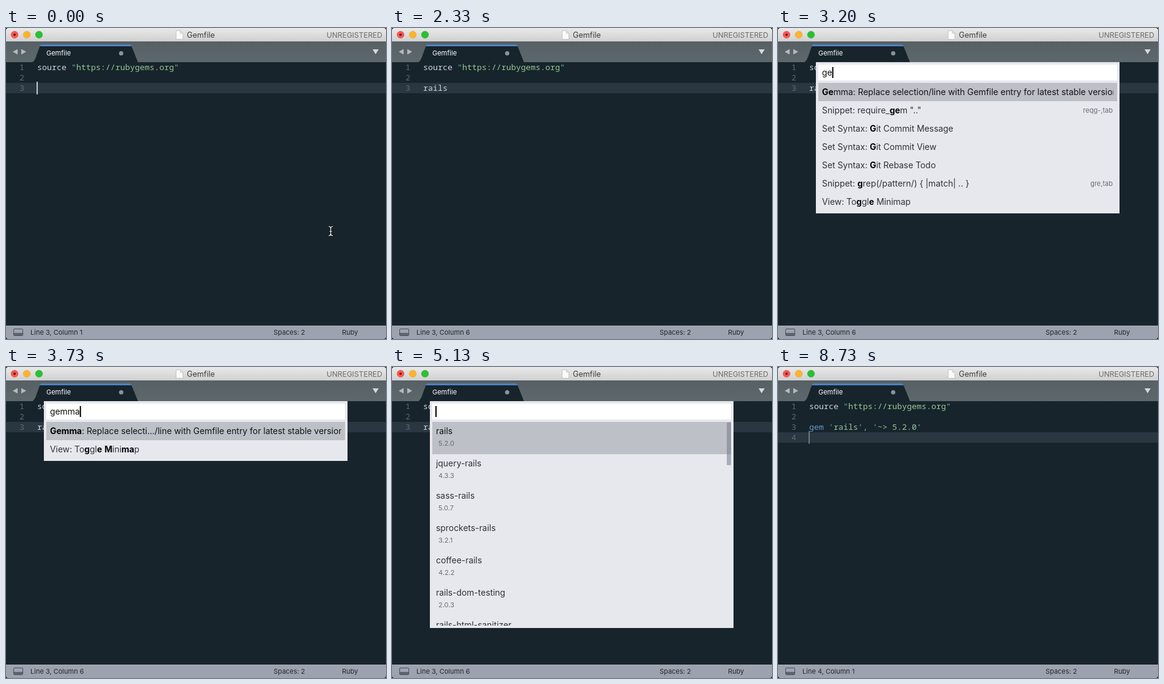
Write an HTML page that moves like this. It is 622 px wide and 510 px high and loops after 8.79 s.

```html
<!DOCTYPE html>
<html lang="en">
<head>
<meta charset="utf-8">
<title>Gemfile</title>
<style>
  html, body { margin: 0; width: 100%; height: 100%; overflow: hidden; background: #000; }
  svg { display: block; width: 622px; height: 510px; }
  text { font-family: Inter, "Open Sans", sans-serif; white-space: pre; }
  .code text { font: 13.33px "Noto Sans Mono", "DejaVu Sans Mono", monospace; fill: #cfd5de; }
  .code .num { fill: #5d6a73; }
  .str { fill: #99c794; }
  .quo { fill: #5fb3b3; }
  .fn { fill: #6699cc; }
  .status { font-size: 11px; fill: #23282e; }
  .item { font-size: 13.9px; fill: #2d323b; }
  .item tspan { font-weight: 700; fill: #000; }
  .sel { fill: #111418; }
  .small { font-size: 11px; fill: #666c77; }
  .typed { font-size: 13.9px; fill: #111; }
</style>
</head>
<body>
<svg viewBox="0 0 622 510" xmlns="http://www.w3.org/2000/svg">
  <defs>
    <linearGradient id="title" x2="0" y2="1">
      <stop stop-color="#e9e9e9"/><stop offset="1" stop-color="#d0d0d0"/>
    </linearGradient>
    <linearGradient id="tabs" x2="0" y2="1">
      <stop stop-color="#566065"/><stop offset="1" stop-color="#5d686c"/>
    </linearGradient>
    <clipPath id="win"><rect width="622" height="510" rx="4"/></clipPath>
    <clipPath id="list"><rect x="66" y="90" width="489" height="334"/></clipPath>
    <clipPath id="words"><rect x="66" y="90" width="483" height="334"/></clipPath>
  </defs>
  <g clip-path="url(#win)">
    <rect width="622" height="510" fill="#17242c"/>

    <rect width="622" height="22" fill="url(#title)"/>
    <circle cx="14" cy="11" r="5.8" fill="#fc5753" stroke="#df4744" stroke-width=".6"/>
    <circle cx="14" cy="11" r="2" fill="#6e0b08"/>
    <circle cx="34" cy="11" r="5.8" fill="#fdb32b" stroke="#de9f34" stroke-width=".6"/>
    <circle cx="54" cy="11" r="5.8" fill="#28c132" stroke="#27aa35" stroke-width=".6"/>
    <path d="M278.5 4.5h7l4 4v10h-11z" fill="#fafafa" stroke="#bcbcbc" stroke-width=".8"/>
    <path d="M285.5 4.5v4h4" fill="#e4e4e4" stroke="#bcbcbc" stroke-width=".8"/>
    <text x="296" y="16" font-size="12.6" fill="#3c3c3c">Gemfile</text>
    <text x="616" y="16" font-size="12" fill="#6b6b6b" text-anchor="end">UNREGISTERED</text>

    <rect y="22" width="622" height="34" fill="url(#tabs)"/>
    <path d="M19 34.5v9l-8-4.5zM25 34.5v9l8-4.5z" fill="#b4babd"/>
    <path d="M600 35h10l-5 8z" fill="#d5d9db"/>
    <path d="M43 56C48 54 50 44 55 31Q56 28 59 28H202Q205 28 206 31L216 56z" fill="#17242c"/>
    <path d="M55 30Q56 27 59 27H202Q205 27 206 30z" fill="#4c84c4"/>
    <text x="66" y="45" font-size="11" fill="#fff">Gemfile</text>
    <circle cx="188.5" cy="41.5" r="3.5" fill="#8a9397"/>

    <rect id="band" width="622" height="17" fill="#2a3740"/>
    <g class="code">
      <g id="nums" text-anchor="end"></g>
      <text x="51" y="69">source <tspan class="quo">"</tspan><tspan class="str">https://rubygems.org</tspan><tspan class="quo">"</tspan></text>
      <text id="line3" x="51" y="103"></text>
    </g>
    <rect id="caret" width="2" height="21" fill="#c3c9d1"/>

    <rect y="488" width="622" height="22" fill="#9ca2ae"/>
    <rect y="488" width="622" height="1" fill="#a8aeb9"/>
    <rect x="12.5" y="493.5" width="15" height="11" rx="1.5" fill="none" stroke="#4a5058"/>
    <rect x="13" y="500" width="14" height="4" fill="#5f656f"/>
    <text id="place" class="status" x="40" y="503"></text>
    <text class="status" x="438" y="503">Spaces: 2</text>
    <text class="status" x="550" y="503">Ruby</text>

    <g id="palette">
      <rect id="panel" x="62" y="56" width="497" fill="#e7e8ed"/>
      <rect x="66" y="60" width="489" height="26" fill="#fff"/>
      <text id="typed" class="typed" x="72" y="78"></text>
      <rect id="mark" y="64" width="2" height="18" fill="#000"/>
      <g id="rows" clip-path="url(#list)"></g>
    </g>

    <g id="beam" fill="none" stroke-linecap="round">
      <path id="ibeam" d="M528.5 325.5q3 0 3 3v9q0 3-3 3M534.5 325.5q-3 0-3 3M534.5 340.5q-3 0-3-3M530 333.5h3" stroke="#111" stroke-width="2.6"/>
      <use href="#ibeam" style="display:none"/>
      <path d="M528.5 325.5q3 0 3 3v9q0 3-3 3M534.5 325.5q-3 0-3 3M534.5 340.5q-3 0-3-3M530 333.5h3" stroke="#fff" stroke-width="1.2"/>
    </g>
  </g>
</svg>
<script>
const LOOP = 8790;
const $ = id => document.getElementById(id);
const set = (el, attrs) => { for (const k in attrs) el.setAttribute(k, attrs[k]); };

// Asterisks mark the letters matched by the query; "|>" splits off the key hint.
const FULL = "Gemma: Replace selection/line with *G*emfile entry for latest stable version";
const SHORT = "*Gemma*: Replace selecti…/line with Gemfile entry for latest stable version";
const MINIMAP = "View: To*g*gl*e* *M*ini*ma*p";
const COMMANDS = [
  "Emmet: *G*o to Matching Pair|>shiftT",
  "Preferences: *G*itGutter Key Bindings",
  "Preferences: *G*itGutter Popup Stylesheet",
  "Set Syntax: *G*raphviz (DOT)",
  "Set Syntax: *G*it Commit Message",
  "Set Syntax: *G*it Commit View",
  "Set Syntax: *G*it Rebase Todo",
  'Snippet: require_*g*em ".."|>reqg-,tab',
  FULL,
  "Snippet: *g*rep(/pattern/) { |match| .. }|>gre,tab",
  "Snippet: *g*sub(/../) { |match| .. }|>gsu,tab"
];
const GEMS = [
  ["rails", "5.2.0"], ["jquery-rails", "4.3.3"], ["sass-rails", "5.0.7"],
  ["sprockets-rails", "3.2.1"], ["coffee-rails", "4.2.2"],
  ["rails-dom-testing", "2.0.3"], ["rails-html-sanitizer", "1.0.4"]
];
const plain = s => s.replace(/\*/g, "");
const pick = (...ids) => ids.map(i => COMMANDS[i]);
const browse = { top: 94, sel: 8, bar: [146, 36] };
const LISTS = {
  all: { ...browse, rows: COMMANDS.map(plain) },
  g: { ...browse, rows: COMMANDS },
  ge: { rows: ["*Ge*mma: Replace selection/line with Gemfile entry for latest stable version",
    'Snippet: require_*ge*m ".."|>reqg-,tab', ...pick(4, 5, 6, 9), MINIMAP.replace("*M*", "M").replace("*ma*", "ma")] },
  gem: { rows: [SHORT.replace("*Gemma*", "*Gem*ma"),
    'Snippet: require_*gem* ".."|>reqg-,tab', MINIMAP.replace("*ma*", "ma")] },
  gemm: { rows: [SHORT.replace("*Gemma*", "*Gemm*a"), MINIMAP.replace("*ma*", "*m*a")] },
  gemma: { rows: [SHORT, MINIMAP] },
  gems: { gems: true, bar: [91, 70] }
};

const GEM_LINE = `<tspan class="fn">gem</tspan> <tspan class="quo">'</tspan><tspan class="str">rails</tspan><tspan class="quo">'</tspan>` +
  `<tspan class="quo">,</tspan> <tspan class="quo">'</tspan><tspan class="str">~> 5.2.0</tspan><tspan class="quo">'</tspan>`;

// Each event changes part of the state and restarts the caret blink.
const EVENTS = [
  [0, { text: "", col: 0, line: 3, list: "", typed: "" }],
  ...[1130, 1270, 1400, 1530, 1730].map((at, i) => [at, { text: "rails".slice(0, i + 1), col: i + 1 }]),
  [2730, { list: "all" }],
  ...[2930, 3130, 3270, 3470, 3600].map((at, i) => {
    const typed = "gemma".slice(0, i + 1);
    return [at, { list: typed, typed }];
  }),
  [3800, { list: "", typed: "" }],
  [5130, { list: "gems" }],
  [5800, { list: "", text: GEM_LINE, col: 23 }],
  [6730, { line: 4, col: 0 }]
];

function blink(age) {
  if (age < 250) return 1;
  const p = (age - 250) % 1060;
  if (p < 270) return 1 - p / 270;
  if (p < 600) return 0;
  return Math.min(1, (p - 600) / 200);
}

const label = (s, y, sel) =>
  `<text class="item" x="72" y="${y}" clip-path="url(#words)"${sel ? ' style="fill:#111418"' : ""}>` +
  s.replace(/\*(.+?)\*/g, "<tspan>$1</tspan>") + "</text>";

function hint(s, y) {
  if (!s) return "";
  const tail = s.replace("shift", "");
  const keys = s === tail ? "" :
    `<path d="M523.5 ${y - 5}l2.5-3 2.5 3M531.5 ${y - 4.5}l4-4 4 4h-2v4h-4v-4z" fill="none" stroke="#666c77"/>`;
  return keys + `<text class="small" x="548" y="${y}" text-anchor="end">${tail}</text>`;
}

const selRow = (y, h) => `<rect x="66" y="${y}" width="489" height="${h}" fill="#bdc0c6"/>`;

function drawList(name) {
  const { rows, gems, top = 90, sel = 0, bar } = LISTS[name];
  const high = gems ? 53 : 30;
  let out = selRow(top + sel * high, high);
  if (gems) {
    GEMS.forEach(([gem, version], i) => {
      const y = top + i * high;
      out += label(gem, y + 20, i === sel) + `<text class="small" x="76" y="${y + 39}">${version}</text>`;
    });
  } else {
    rows.forEach((row, i) => {
      const [s, key] = row.split("|>");
      const y = top + i * high + 20;
      out += label(s, y, i === sel) + hint(key, y - 1);
    });
  }
  if (bar) out += `<rect x="548" y="${bar[0]}" width="7" height="${bar[1]}" rx="1" fill="#6b7685" opacity=".5"/>`;
  $("rows").innerHTML = out;
  set($("panel"), { height: bar ? 372 : 38 + rows.length * 30 });
}

let shown = "";
function apply(s) {
  const key = [s.text, s.col, s.line, s.list, s.typed].join("~");
  if (key === shown) return;
  shown = key;
  $("line3").innerHTML = s.text;
  $("place").textContent = `Line ${s.line}, Column ${s.col + 1}`;
  $("nums").innerHTML = Array.from({ length: s.line }, (_, i) =>
    `<text class="num" x="30" y="${69 + i * 17}">${i + 1}</text>`).join("");
  const y = 56 + (s.line - 1) * 17;
  set($("band"), { y });
  set($("caret"), { x: 50 + s.col * 8, y: y - 2 });
  $("palette").style.display = s.list ? "" : "none";
  if (!s.list) return;
  $("typed").textContent = s.typed;
  set($("mark"), { x: s.typed ? 72 + $("typed").getComputedTextLength() : 71 });
  drawList(s.list);
}

function draw(t) {
  const state = {};
  let last = 0;
  for (const [at, change] of EVENTS) {
    if (at > t) break;
    Object.assign(state, change);
    last = at;
  }
  apply(state);
  const glow = blink(t - last);
  set($("caret"), { opacity: state.list ? 0 : glow });
  set($("mark"), { opacity: glow });
  $("beam").style.display = t < 70 ? "" : "none";
}

const start = performance.now();
function tick() {
  draw((performance.now() - start) % LOOP);
  requestAnimationFrame(tick);
}
draw(0);
requestAnimationFrame(tick);
</script>
</body>
</html>
```
